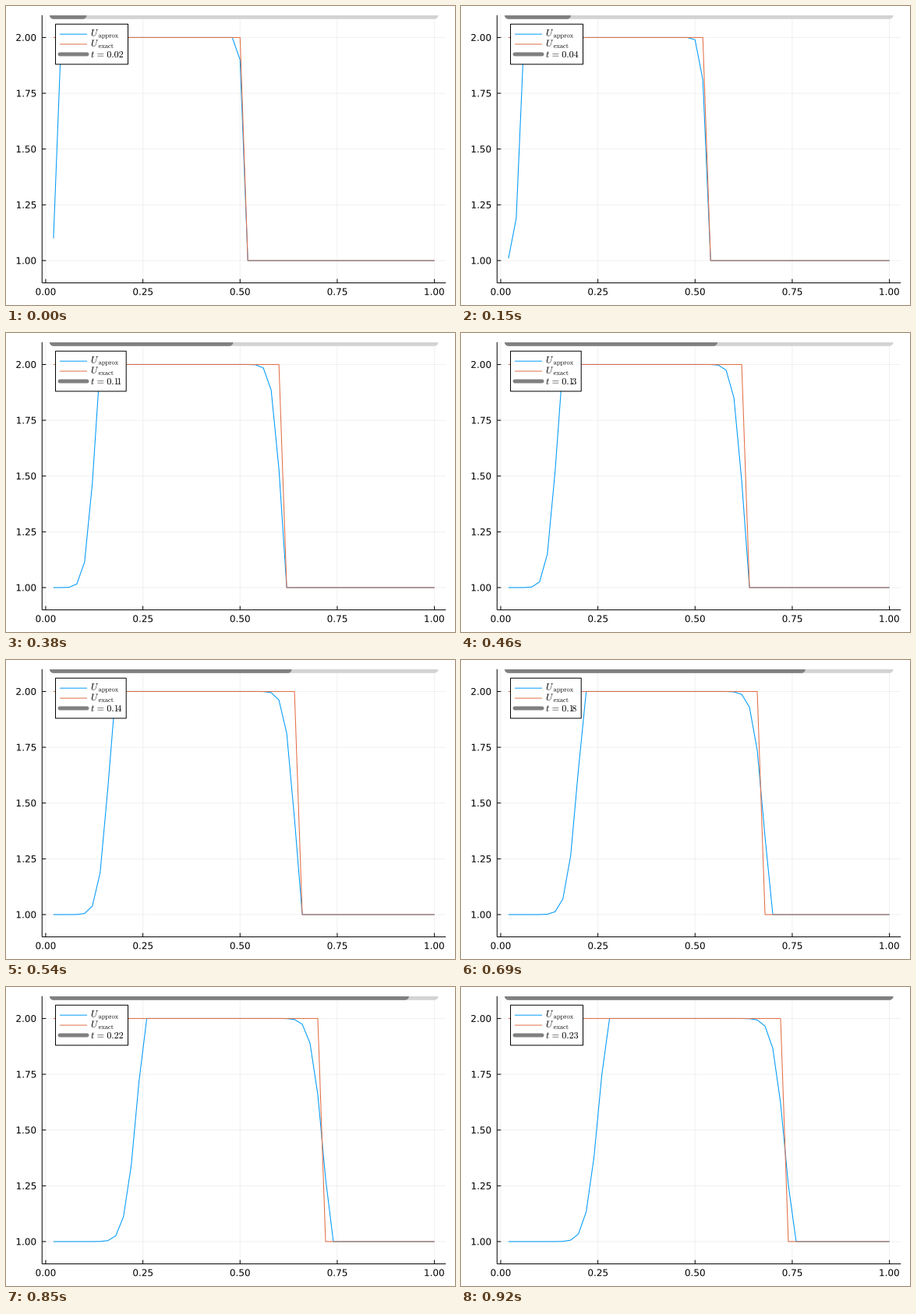
A matplotlib script for the animation above (990 ms loop, 576 by 384 pixels).

```python
import numpy as np
import matplotlib.pyplot as plt
from matplotlib.animation import FuncAnimation
from matplotlib.patches import PathPatch, Rectangle
from matplotlib.textpath import TextPath
from matplotlib.transforms import Affine2D

W, H, DPI = 576, 384, 96
PX = 72 / DPI  # points per pixel

BLUE, ORANGE = "#009afa", "#e36f47"
GRAY, LIGHT = "#808080", "#d3d3d3"

DX, DT, STEPS = 0.02, 0.018, 13
TICK = 10  # ms
STARTS = [0, 8, 16, 23, 31, 38, 46, 54, 62, 69, 77, 85, 92]
FRAMES = 99

x = DX * np.arange(1, 51)
start = np.where(x < 0.5 - 1e-9, 2.0, 1.0)

plt.rcParams.update({"font.family": "DejaVu Sans", "mathtext.fontset": "cm"})
fig = plt.figure(figsize=(W / DPI, H / DPI), dpi=DPI, facecolor="white")

# Plot area, given by its pixel edges
left, right, top, bottom = 46.25, 564.25, 11.8, 355.6
ax = fig.add_axes([left / W, 1 - bottom / H, (right - left) / W, (bottom - top) / H])
ax.set_xlim(-0.0094, 1.0294)
ax.set_ylim(0.9, 2.1)
ax.axis("off")

# Overlay in pixel coordinates for axes, labels and legend
over = fig.add_axes([0, 0, 1, 1])
over.set_xlim(0, W)
over.set_ylim(H, 0)
over.axis("off")


def line(axes, xs, ys, color="black", width=1.0, z=3, cap="butt", **style):
    return axes.plot(xs, ys, color=color, lw=width * PX, solid_capstyle=cap,
                     snap=False, zorder=z, **style)[0]


def glyphs(px, py, text, align):
    """Outline of the text with its baseline at py."""
    path = TextPath((0, 0), text, size=12)
    ink = path.get_extents()
    shift = {"left": 0, "center": (ink.x0 + ink.x1) / 2, "right": ink.x1}[align]
    return Affine2D().scale(1, -1).translate(px - shift, py).transform_path(path)


def label(px, py, text, align="left"):
    return over.add_patch(PathPatch(glyphs(px, py, text, align), facecolor="black",
                                    lw=0, snap=False, zorder=5))


def bar(end, color, z):
    return line(ax, [DX, end], [2.1, 2.1], color, 10, z, "round")


# Axes, ticks and grid
line(over, [left, left], [top, bottom])
line(over, [left, right], [bottom, bottom])
for v in np.linspace(0, 1, 5):
    px = left + (v + 0.0094) / 1.0388 * (right - left)
    line(over, [px, px], [bottom, bottom - 5])
    label(px, 371.2, f"{v:.2f}", "center")
    ax.axvline(v, color="black", alpha=0.06, lw=PX, snap=False, zorder=1)
for v in np.linspace(1, 2, 5):
    py = bottom - (v - 0.9) / 1.2 * (bottom - top)
    line(over, [left, left + 5], [py, py])
    label(38.3, py + 4.4, f"{v:.2f}", "right")
    ax.axhline(v, color="black", alpha=0.06, lw=PX, snap=False, zorder=1)

approx_line = line(ax, [], [], BLUE, 1.05)
exact_line = line(ax, [], [], ORANGE, 1.05)
bar(1.0, LIGHT, 4)
progress = bar(1.0, GRAY, 5)

# Legend, inset by a thirtieth of the plot area
box_x = left + (right - left) / 30
box_y = top + (bottom - top) / 30
row = 12.9
box = over.add_patch(Rectangle((box_x, box_y), 93, 4 * row, facecolor="white",
                               edgecolor="black", lw=PX, snap=False, zorder=3))
for k, color, width, cap in ((1, BLUE, 1, "butt"), (2, ORANGE, 1, "butt"),
                             (3, GRAY, 5, "round")):
    py = box_y + k * row
    line(over, [69, 104], [py, py], color, width, 4, cap)
label(109, 38.5, r"$U_{\hspace{0.2}\mathrm{approx}}$")
label(109, 51.9, r"$U_{\hspace{0.2}\mathrm{exact}}$")
time_label = label(109, 66, "$t$")


def upwind(n):
    """Periodic upwind advection with unit speed after n steps."""
    u = start
    for _ in range(n):
        u = u - DT / DX * (u - np.roll(u, 1))
    return u


def time_text(value):
    """Label text and the legend's right edge; a digit after 1 sits closer."""
    text, edge = str(value), 156.5
    if len(text) == 3:
        edge = 150.5
    elif text.startswith("0.1"):
        text, edge = r"0.1\hspace{-0.22}" + text[3:], 154.2
    gap = r"\hspace{0.116}"
    return f"$t{gap}={gap}{text}$", edge


def update(i):
    n = int(np.searchsorted(STARTS, i, side="right"))
    t = n * DT
    approx_line.set_data(x, upwind(n))
    exact_line.set_data(x, np.where(x - t < 0.5 - 1e-9, 2.0, 1.0))
    progress.set_data([DX, DX + (1 - DX) * n / STEPS], [2.1, 2.1])
    text, edge = time_text(round(t, 2))
    time_label.set_path(glyphs(109, 66, text, "left"))
    box.set_width(edge - box_x)
    return approx_line, exact_line, progress, time_label, box


anim = FuncAnimation(fig, update, frames=FRAMES, interval=TICK,
                     repeat=True, repeat_delay=0, blit=False)
plt.show()
```
